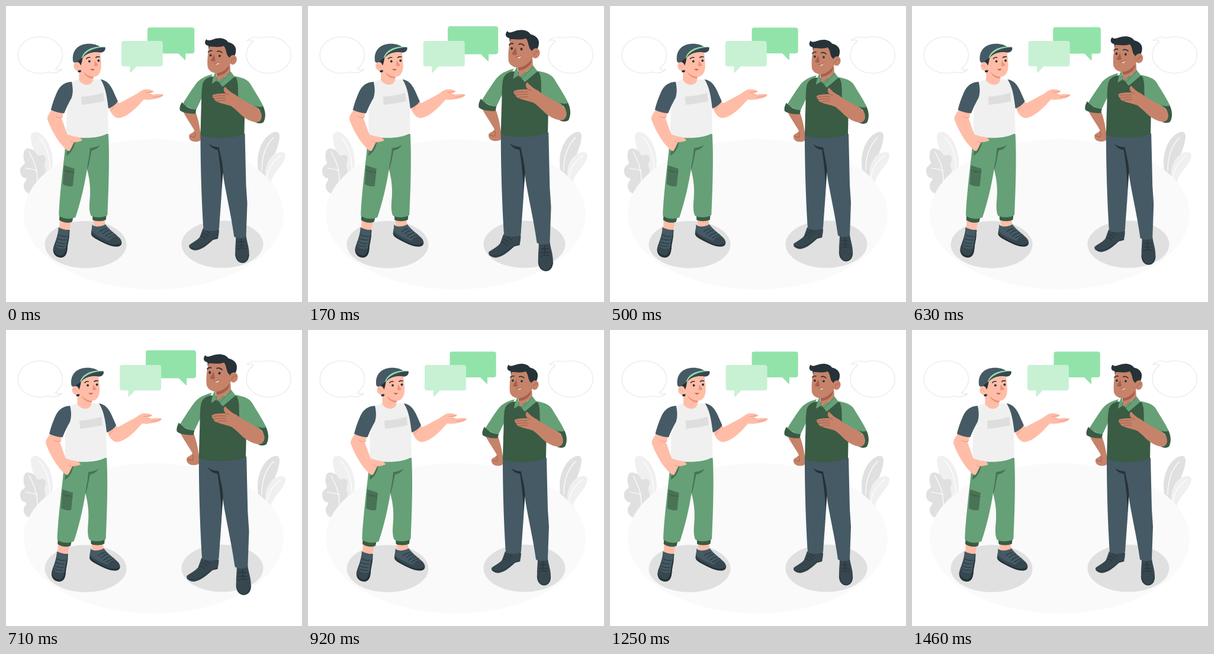
Write an HTML page with a canvas that moves like this. It is 500 px wide and 500 px high and loops after 1.5 s.

```html
<!DOCTYPE html>
<html lang="en">
<head>
<meta charset="utf-8">
<title>Conversation</title>
<style>
html, body { margin: 0; width: 100%; height: 100%; overflow: hidden; background: #fff; }
canvas { display: block; width: 100vw; height: 100vh; }
</style>
</head>
<body>
<canvas id="stage"></canvas>
<script>
const canvas = document.getElementById('stage');
const ctx = canvas.getContext('2d');
const ratio = window.devicePixelRatio || 1;
canvas.width = canvas.height = 500 * ratio;

const WHITE = '#fff', GREY = '#e0e0e0', PALE = '#f0f0f0', LINE = '#e6e6e6';
const NAVY = '#455a64', SHOE = '#37474f', INK = '#263238';
const MINT = '#92e3a9', MINT_LIGHT = '#c8f1d4', GREEN = '#66a077', FOLD = '#4a7256', FOREST = '#3a5b44';
const PEACH = '#ffbda7', PEACH_SHADE = '#f0937b', LIP = '#b5554b';
const TAN = '#c6836a', TAN_SHADE = '#a4604c';

const fill = (color, d) => ({ color, path: new Path2D(d) });
const line = (color, width, d) => ({ color, width, path: new Path2D(d) });
const oval = (color, x, y, rx, ry = rx, turn = 0) => {
  const path = new Path2D();
  path.ellipse(x, y, rx, ry, turn, 0, Math.PI * 2);
  return { color, path };
};

const outlineBubble = line(LINE, 1.1, 'M83.5 106C91 100 95.5 92 95.5 83C95.5 66 79 52 57.5 52S20 66 20 83S36 113.5 57.5 113.5C63 113.5 68 112.5 71 111.5C79 114 88 113 94.5 107C90 108.5 86 108 83.5 106Z');

const scenery = [
  fill(PALE, 'M42 221C42 214 47 211 53 213C66 218 79 238 79 264L76 292H64C62 268 43 248 42 221Z'),
  line(WHITE, 1.2, 'M56 222C67 234 74 252 74 276'),
  fill(GREY, 'M33 242C36 240 40 241 43 242C49 244 50 248 53 252C56 254 60 250 65 253C69 257 66 262 65 267C64 272 67 273 67 279C66 288 60 295 54 304L42 318C34 316 29 310 30 302C31 296 36 295 34 291C28 291 23 285 24 276C25 269 32 269 32 264C29 260 28 246 33 242Z'),
  line(WHITE, 1.2, 'M39 246C46 260 54 272 53 304M33 274Q43 275 53 278'),
  fill(GREY, 'M462 222C463 214 458 211 453 213C438 218 426 237 425 262L426 292H439C441 268 459 250 462 222Z'),
  line(WHITE, 1.2, 'M452 222C441 233 432 251 432 278'),
  fill(PALE, 'M472 253C472 248 468 246 462 247C449 250 440 262 438 280V300H447C451 279 470 270 472 253Z'),
  line(WHITE, 1.2, 'M464 253C452 261 443 272 441 290'),
  oval('#fafafa', 249.5, 352, 219.5, 127),
  oval(GREY, 134.5, 403, 69, 40),
  oval(GREY, 365.5, 402.5, 69, 40)
];

const frontBubble = [
  fill(MINT_LIGHT, 'M199 59H261Q265 59 265 63V98Q265 102 261 102H221L211 112.5Q209.5 113.5 209.5 111.5V102H199Q195 102 195 98V63Q195 59 199 59Z')
];

const backBubble = [
  fill(MINT, 'M243.5 36.6H313.7Q317.7 36.6 317.7 40.6V76Q317.7 80 313.7 80H303V90Q303 92 301.5 90.5L291 80H243.5Q239.5 80 239.5 76V40.6Q239.5 36.6 243.5 36.6Z')
];

const capMan = [
  // legs and shoes
  fill(PEACH, 'M91 361L110 363L107 380L90 377ZM147 359L166 360L169 373L150 374Z'),
  fill(SHOE, 'M89 374C94 377 102 379 107.5 378C108 386 105 394 104 403C104 414 103 425 92 425C83 424 79 417 80 409C82 400 88 390 89 374Z'),
  fill(NAVY, 'M89 374C94 377 102 379 106.5 378C106 386 103 397 101 409C95 412 88 410 84 406C86 396 90 388 89 374Z'),
  fill(INK, 'M80 410C82 419 89 422 95 421C101 418 102 409 105 391C108 385 108 380 107.5 378C108 390 105 399 104 408C103 420 100 425 92 425C83 424 79 417 80 410Z'),
  line(INK, 1.2, 'M90 387Q96 390 103 389M88 393Q94 396 101 395M87 399Q93 402 100 401M86 404Q92 407 99 406'),
  fill(SHOE, 'M146 369C148 374 160 374 168 369C173 376 183 384 190 390C197 396 198 404 190 406C178 407 165 400 157 396C150 392 144 389 144 384C144 378 146 374 146 369Z'),
  fill(NAVY, 'M146 369C148 374 160 374 168 369C173 376 181 382 188 388C184 388 178 391 175 397C163 392 152 388 145 380Z'),
  fill(INK, 'M144 383C148 389 159 394 167 398.5C178 404 189 405 195 400C195 404 193 406 188 406.5C177 407 165 400 157 396C150 392 143 389 144 383Z'),
  line(INK, 1.2, 'M159 381Q163 377 170 376M164 385Q168 380 175 379M168 389Q173 384 180 383M173 392Q178 388 185 386'),
  fill(FOREST, 'M91 350H115L112 364.5C104 368 95 365 90 361.5ZM146 350H170L169 361C162 364.5 152 364 146.5 361.5Z'),
  fill(GREEN, 'M102 216H173C175 250 174 300 171.5 353C165 358 150 358 143.5 354C140 345 141 335 142 322C143 305 141 290 137 276C133 302 126 332 117.5 357C109 361 96 360 89.5 354C90 330 95 285 99 250Z'),
  fill(FOLD, 'M159 234C153 239 147 239 142 240C141 255 138 266 137 276C140 274 142 256 145 244C152 243 157 239 159 234ZM117 229C115 240 111 248 102 253L103 246Z'),
  fill(FOLD, 'M98 269L116 275L113 304C109 306 101 304 96 301Z'),
  line(FOREST, 1, 'M97.5 277Q106 281 115 281M103 279L105 281L108 279'),
  // torso
  fill('#f0f0f0', 'M109 130C114 127 119 125 124 124H147L162 124C169 138 172 155 172 172L173 214C160 225 117 225 102 218L103 178L109 150Z'),
  fill('#dedede', 'M127 153Q147 152 164.5 146.5L166 161Q147 165 128 167Z'),
  fill(PEACH, 'M123.5 106L148 114L147 126C144 136 129 135 123.5 125Z'),
  fill(PEACH_SHADE, 'M130 110C136 117 142 119 148 119V122C141 123 134 119 130 110Z'),
  // arms
  fill(PEACH, 'M78 175C73 181 70 186 70 191C74 204 84 222 92 232C97 238 103 245 107 245C110 242 112 236 115 230C120 230 126 229 129 227C127 222 121 221 114 220L104 217C100 208 97 197 94 190L98 179Z'),
  line(PEACH_SHADE, 1, 'M84 186Q90 191 96 187M116 230Q111 231 109 228'),
  fill(PEACH, 'M174 171C176 179 181 187 188 189C194 190 202 186 209 181C218 175 228 163 233 158C240 159 248 158 256 156C261 155 266 152 266 150C261 148 254 149 247 150L241 149C244 147 248 147 249 144C246 141 240 140 234 141C229 142 225 146 220 149L192 164L188 162Z'),
  line(PEACH_SHADE, 1, 'M249 144Q242 146 236 146M241 149L247 150M248 154Q257 154 264 151M178 176L183 170'),
  fill(NAVY, 'M111 128C100 128.5 91.5 134 86.5 145C82 155 78 166 76 175.5C83 179 91 181 98.5 181C102 172 106 164 111 155C114 146 113 136 111 128Z'),
  fill(NAVY, 'M160 124C170 125 177 134 181 143L189 161C185 167 179 171 173 173C171 156 169 138 160 124Z'),
  // head
  fill(INK, 'M117 93L131 84V101L126 112H122Z'),
  fill(PEACH, 'M127 99C129 94 129 88 131 83C140 75 151 75 159 78C160 86 161 92 161 101C161 111 157 119 149 119.5C142 120 134 115 129 109L123 108Z'),
  oval(PEACH, 120.5, 102, 6, 7.5, -0.2),
  line(PEACH_SHADE, 0.9, 'M117 101Q120 99 122 104'),
  fill(PEACH_SHADE, 'M150 92L156 100Q153 103 149 101Z'),
  oval(INK, 141, 93.5, 1.9, 2.1),
  oval(INK, 156.5, 92.3, 1.9, 2.1),
  line(INK, 1.7, 'M136 89Q138 86 142 87M152 87Q155 85 158 86'),
  fill(LIP, 'M142 106Q146 107 150 106Q147 112 142 106Z'),
  fill(NAVY, 'M113.5 94C111 79 118 66 136 64C147 63 155 66 159 69L167.5 69.5C169 74 166 78 160 78.5C148 76 137 79 130 87C125 91 120 94 116 96Z'),
  fill(SHOE, 'M128 88C134 78 148 72 167.5 70C168 75 165 78.5 160 78.5C148 76 137 79 128 88Z'),
  fill(MINT, 'M128 88C131 75 146 66.5 167.5 69.2C149 70 135 76 130 86.5Z')
];

const vestMan = [
  // resting arm
  fill(TAN, 'M300 179C304 188 313 200 319 211C316 216 312 215 310 219C309 226 314 229 320 229.5C326 229.5 331 228 331 222L328 208C327 199 324 189 321 180Z'),
  line(TAN_SHADE, 1, 'M319 214Q322 217 319 222M312 220L319 222'),
  fill(GREEN, 'M349 117C338 120 328 124 321 133.5C312 146 305 157 299 167L321 178L332 155L346 124Z'),
  fill(FOREST, 'M298 163.5C304 171 313 175.5 322 176L320.5 182.5C312 183.5 300 181.5 295 177.5C293.5 173 295.5 168 298 163.5Z'),
  // legs and shoes
  fill(SHOE, 'M333 374L360 376C360 382 359 387 358 391L350 393C342 400 333 409 322 410.5C315 411 309 406 310 402C314 398 324 394 328 388Z'),
  line(INK, 1, 'M311 406Q323 411 336 402T349 392.5L358 390M329 387Q334 386 338 391M333 382Q338 382 342 387M338 378Q342 379 345 383'),
  fill(SHOE, 'M388 386H405C406 395 410 405 410 415C411 425 406 432 398 431.5C389 430 386 422 387 412C387 402 388 396 388 386Z'),
  line(INK, 1, 'M387.5 417Q390 430 398 430.5T409.5 418M391 397Q397 395 403 397M391 403Q397 401 404 403M390 409Q397 405 405 408M397 391V406'),
  fill(NAVY, 'M329 216H403L405 302L407 332L405 388C398 391 390 391 385 387.5C380 350 370 310 366 280C365 310 362 345 360 375C354 379 340 379 334 375.5C331 330 329 270 329 216Z'),
  fill(INK, 'M343 233C349 238 355 238 360 239C362 252 367 267 366.5 281L364 308C364 285 361 262 358 243C351 242 346 239 343 233Z'),
  // torso
  fill(GREEN, 'M384 120C397 122 407 125 412 133C419 145 428 158 434 171L420 177L393 160L385 140Z'),
  fill(FOREST, 'M349 121C339 122 333 128 332 136C330 150 331 165 330 180L329 218C342 225 385 225 402 216L403 165L392 156C391 144 393 132 388 122Z'),
  fill(TAN, 'M355 110L378 98L379 114L357 130Z'),
  fill(TAN_SHADE, 'M356 113C364 114 372 108 377 101C378 111 368 119 356 120Z'),
  fill(GREEN, 'M355 113Q350 117 348 133L357 127L366 138L386 121L379 112Q371 122 357 129Q355 121 355 113Z'),
  line(FOLD, 0.8, 'M357 128L362 132L379 114'),
  // raised arm
  fill(TAN, 'M387 151C395 158 412 166 420 171C430 178 437 188 431 196C423 199 412 196 402 189C395 184 390 177 380 170C372 167 364 166 357 163C353 161 352 160 352 158C349 156 349 154 349 152C354 149 362 149 371 149C368 146 366 141 370 138C374 142 378 147 387 151Z'),
  line(TAN_SHADE, 1, 'M351 154Q361 152 371 153M352 158Q361 156 371 157M357 162Q363 160 371 161M371 149L376 151'),
  fill(FOREST, 'M418 168C424 172 429 172 433.5 170.5C438 180 438 190 434 197C430 200 424 199 420 197C432 199 438 181 418 168Z'),
  // head
  fill(INK, 'M344 79C342 74 343 71 342 69.5C336 68.5 335 63 339 58.5C341 62 345 60.5 350 59C360 55 371 57 375 63.5C382 65 387 69 388 75C388.5 82 386 87 383 90L377 101L365 90Z'),
  fill(TAN, 'M344 71C341 82 340 95 341 105C343 112 350 116 358 115C366 114 373 108 378 101L377 89C371 85 373 76 368 70C360 73 351 71 344 71Z'),
  oval(TAN, 383, 93, 6.5, 8, 0.2),
  line(TAN_SHADE, 0.9, 'M380 96Q382 89 387 91'),
  fill(TAN_SHADE, 'M352 84L346 94Q349 97 354 95Z'),
  oval(INK, 346, 85.5, 1.8, 2.1),
  oval(INK, 361, 86.5, 1.8, 2.1),
  line(INK, 1.7, 'M342 80Q344 77 348 78M357 79Q361 77 365 81'),
  fill(WHITE, 'M354 100Q357 100 360 97.5Q359 102 354 100Z'),
  line(TAN_SHADE, 0.9, 'M352 99Q356 100 360 97')
];

function paint(shapes) {
  for (const { color, width, path } of shapes) {
    if (width) {
      ctx.strokeStyle = color;
      ctx.lineWidth = width;
      ctx.stroke(path);
    } else {
      ctx.fillStyle = color;
      ctx.fill(path);
    }
  }
}

function placed(shapes, dx, dy, scale = 1) {
  ctx.save();
  ctx.translate(dx, dy);
  ctx.scale(scale, scale);
  paint(shapes);
  ctx.restore();
}

const scaledAbout = (shapes, x, y, scale) =>
  placed(shapes, x * (1 - scale), y * (1 - scale), scale);

// Keys are [progress, value] pairs joined linearly.
function track(keys, p) {
  const i = keys.findIndex(([at]) => at >= p);
  if (i < 1) return keys[0][1];
  const [p0, v0] = keys[i - 1], [p1, v1] = keys[i];
  return v0 + (v1 - v0) * (p - p0) / (p1 - p0);
}

const SHAKE = [0, -1, 2, -4, 4, -4, 4, -4, 2, -1, 0].map((x, i) => [i / 10, x]);
const BEAT = [[0, 1], [0.1, 1.1], [0.3, 1], [0.4, 1], [0.5, 1.1], [0.6, 1], [1, 1]];
const LOOP = 1500, STEPS = 36;

function draw(ms) {
  const step = Math.floor((ms % LOOP + 5) / LOOP * STEPS) % STEPS;
  const progress = (step + 0.5) / STEPS;
  const shift = track(SHAKE, progress);
  const scale = track(BEAT, progress);

  ctx.setTransform(ratio, 0, 0, ratio, 0, 0);
  ctx.lineCap = ctx.lineJoin = 'round';
  ctx.fillStyle = WHITE;
  ctx.fillRect(0, 0, 500, 500);

  paint(scenery);
  paint([outlineBubble]);
  placed([outlineBubble], 501.5, 165.5, -1);
  scaledAbout(backBubble, 278.75, 64, scale);
  placed(frontBubble, shift, 0);
  placed(capMan, shift, 0);
  scaledAbout(vestMan, 366, 243.5, scale);
}

let start;
function tick(now) {
  start ??= now;
  draw(now - start);
  requestAnimationFrame(tick);
}
draw(0);
requestAnimationFrame(tick);
</script>
</body>
</html>
```
